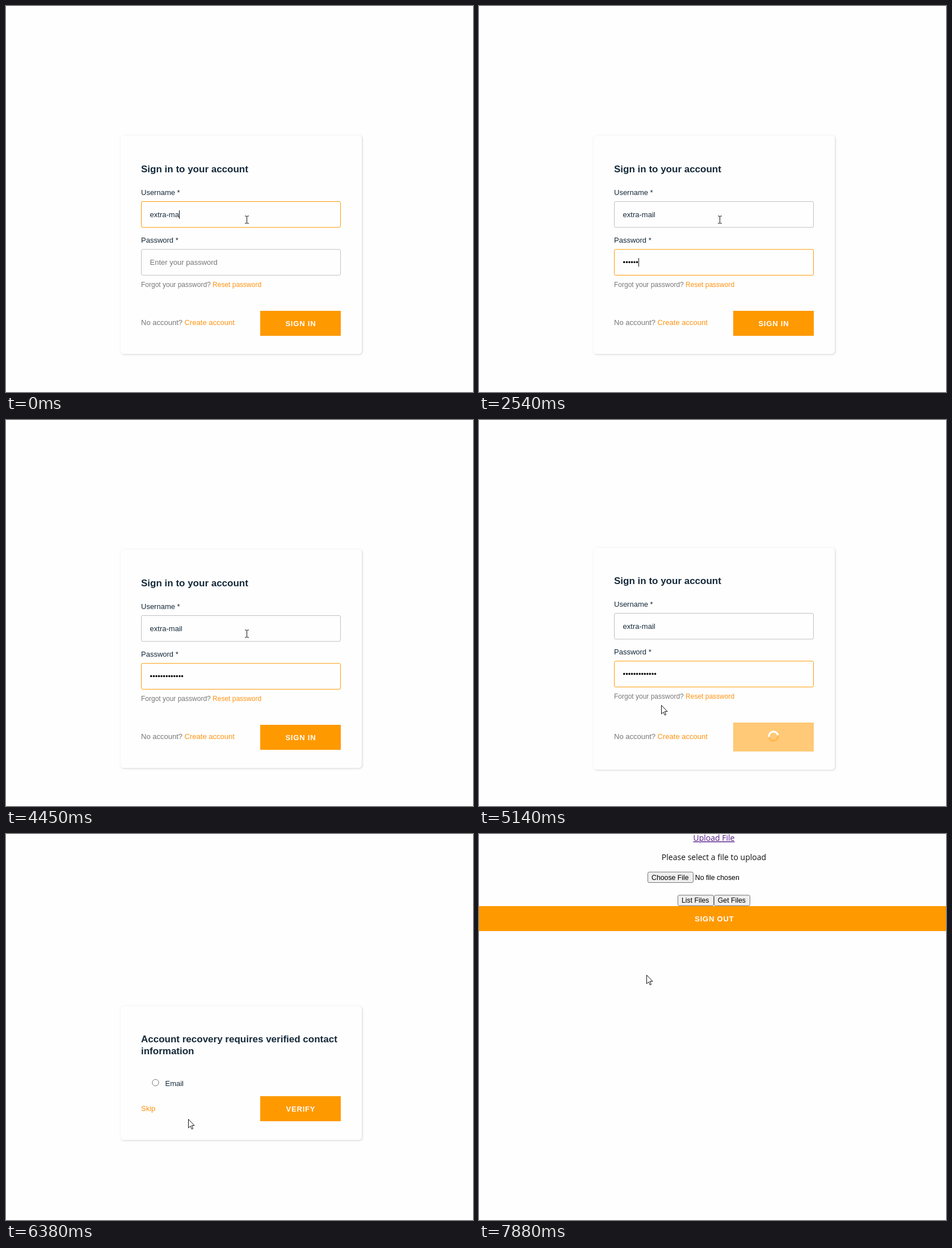
An HTML page for the animation above (8 s loop, 823 by 680 pixels).

```html
<!DOCTYPE html>
<html lang="en">
<head>
<meta charset="utf-8">
<title>Sign in</title>
<style>
html, body { margin: 0; width: 100%; height: 100%; overflow: hidden; background: #fefefe; }
#card {
  position: absolute; left: 202px; width: 425px; border-radius: 5.4px;
  background: #fefefe; box-shadow: 1px 1px 3.6px rgba(0, 0, 0, .17);
}
svg { position: absolute; left: 0; top: 0; }
text { font: 13px "Liberation Sans", Arial, sans-serif; fill: #152939; white-space: pre; }
text.title { font-size: 17px; font-weight: bold; }
text.hint { font-size: 12px; }
.grey { fill: #777; }
.link { fill: #ff9312; }
text.caps { font-weight: bold; letter-spacing: .8px; fill: #fff; text-anchor: middle; }
text.page { font: 14px "Open Sans", "Noto Sans", sans-serif; fill: #111; text-anchor: middle; }
text.page.visited { fill: #551a8b; text-decoration: underline; }
text.native { font-size: 12.3px; fill: #000; }
.field { fill: #fefefe; stroke: #c0c0c0; }
.field.focus { stroke: #f90; }
.orange { fill: #f90; }
.button rect { fill: #efefef; stroke: #767676; }
.cursor { fill: #fff; stroke: #111; stroke-linejoin: round; }
</style>
</head>
<body>
<div id="card"></div>
<svg width="823" height="680" viewBox="0 0 823 680">
  <g id="signIn">
    <g id="fields">
      <text class="title" x="238" y="293">Sign in to your account</text>
      <text x="238" y="333">Username *</text>
      <rect class="field" id="userField" x="238.5" y="344.5" width="351" height="45.5" rx="2.5"/>
      <text id="user" x="253.6" y="372"></text>
      <text x="238" y="417">Password *</text>
      <rect class="field" id="passField" x="238.5" y="428.8" width="351" height="45.5" rx="2.5"/>
      <text id="placeholder" class="grey" x="253.6" y="456">Enter your password</text>
      <text id="pass" x="253.6" y="456" style="fill:#000"></text>
      <rect id="caret" width="1" height="15" fill="#111"/>
      <text class="hint grey" x="238" y="495">Forgot your password? <tspan class="link">Reset password</tspan></text>
    </g>
    <text class="grey" x="238" y="562">No account? <tspan class="link">Create account</tspan></text>
    <g id="ready">
      <rect class="orange" x="448" y="537" width="142" height="44"/>
      <text class="caps" x="519.4" y="564">SIGN IN</text>
    </g>
    <g id="loading">
      <rect x="448" y="533" width="142" height="51" fill="#ffc977"/>
      <g id="spinner" fill="none" stroke-width="3.4">
        <circle r="8" stroke="#ffb952"/>
        <path d="M-8 0A8 8 0 0 1 8 0" stroke="#fff"/>
      </g>
    </g>
  </g>

  <g id="verify">
    <text class="title" x="238" y="367">Account recovery requires verified contact</text>
    <text class="title" x="238" y="387.5">information</text>
    <circle cx="263.5" cy="438" r="5.7" fill="#fff" stroke="#767676"/>
    <text x="280.5" y="444">Email</text>
    <text class="link" x="238" y="488">Skip</text>
    <rect id="ring" x="237.5" y="475" width="26" height="16.5" rx="2" fill="none" stroke="#101010" stroke-width="2"/>
    <rect class="orange" x="448" y="461.8" width="142" height="44.2"/>
    <text class="caps" x="519.4" y="489">VERIFY</text>
  </g>

  <g id="upload">
    <text class="page visited" x="414" y="12">Upload File</text>
    <text class="page" x="414" y="46">Please select a file to upload</text>
    <g class="button">
      <rect x="297.5" y="67" width="80" height="18.5" rx="2.5"/>
      <rect x="350.5" y="107.8" width="63" height="18.5" rx="2.5"/>
      <rect x="414.5" y="107.8" width="63" height="18.5" rx="2.5"/>
    </g>
    <text class="native" x="304" y="80.5">Choose File</text>
    <text class="native" x="380.8" y="80.5">No file chosen</text>
    <text class="native" x="357" y="121">List Files</text>
    <text class="native" x="420.8" y="121">Get Files</text>
    <rect class="orange" y="127" width="823" height="44"/>
    <text class="caps" x="414.8" y="154">SIGN OUT</text>
  </g>

  <path id="beam" class="cursor" style="fill:none" d="M-3 -6.5h2.5l1 1l1 -1h2.5M.5 -6V6M-3 6.5h2.5l1 -1l1 1h2.5"/>
  <path id="arrow" class="cursor" d="M.5 .5V15.8L4 12.5L6.4 18L8.6 17L6.2 11.6H11Z"/>
  <g id="hand" class="cursor">
    <path d="M-2 12V1.5a1.7 1.7 0 0 1 3.4 0V7.5c.3-1 2.6-1 3 .5c.5-.8 2.4-.6 2.7.7c.6-.6 2.2-.2 2.2 1.3V14c0 3-2 4-2 7.5H-.5c0-2-2-3.5-3.2-5.5L-6.4 11.8c-.8-1.4 1-2.6 2.2-1.4z"/>
    <path d="M1.4 7.5v3.5M4.4 8v3M7.1 8.7v2.8"/>
  </g>
</svg>
<script>
const LOOP = 8000, LOADING = 4600, VERIFY = 6380, RING = 7200, UPLOAD = 7320;
const FOCUS_PASS = 580;
const NAME = "extra-mail";
const nameKeys = [120, 270];
const passKeys = [1260, 1390, 1540, 1670, 2110, 2540, 2690, 2810, 2960, 3240, 3490, 3640, 3920];
const caretSteps = [[0, 1], [980, 0], [1260, 1], [4450, 0], [5260, 1], [5800, 0], [6230, 1]];
const cursorSteps = [
  [0, "beam", 424, 376.5],
  [4720, "arrow", 398, 404],
  [4870, "arrow", 345, 480],
  [4990, "arrow", 321, 502],
  [6780, "arrow", 303, 497],
  [6930, "arrow", 268, 495],
  [7050, "hand", 250, 478],
  [UPLOAD, "arrow", 249, 477],
  [7880, "arrow", 295, 248]
];

const $ = id => document.getElementById(id);
const show = (id, on) => { $(id).style.display = on ? "" : "none"; };
const move = (id, x, y, angle = 0) =>
  $(id).setAttribute("transform", `translate(${x} ${y}) rotate(${angle})`);
const current = (steps, t) => steps.filter(step => step[0] <= t).pop();
const pressed = (keys, t) => keys.filter(key => key <= t).length;

function setCard(top, bottom) {
  $("card").style.top = top + "px";
  $("card").style.height = bottom - top + "px";
}

function drawSignIn(t) {
  const loading = t >= LOADING, onPass = t >= FOCUS_PASS;
  const dots = pressed(passKeys, t);
  setCard(loading ? 224.5 : 227.5, loading ? 616 : 613);
  move("fields", 0, loading ? -4 : 0);
  $("user").textContent = NAME.slice(0, 8 + pressed(nameKeys, t));
  $("pass").textContent = "\u2022".repeat(dots);
  show("placeholder", !dots);
  $("userField").classList.toggle("focus", !onPass);
  $("passField").classList.toggle("focus", onPass);

  const typed = $(onPass ? "pass" : "user");
  const width = typed.textContent ? typed.getComputedTextLength() : 0;
  $("caret").setAttribute("x", Math.round(253.6 + width));
  $("caret").setAttribute("y", onPass ? 444 : 360);
  show("caret", current(caretSteps, t)[1]);

  show("ready", !loading);
  show("loading", loading);
  const turn = Math.floor((t - 4450) / 136) * 136;
  move("spinner", 519, 557, -12 + (turn - 680) * 90 / 1088);
}

function draw(t) {
  const page = t < VERIFY ? "signIn" : t < UPLOAD ? "verify" : "upload";
  for (const id of ["signIn", "verify", "upload"]) show(id, id === page);
  show("card", page !== "upload");
  if (page === "signIn") drawSignIn(t);
  if (page === "verify") setCard(303, 538.5);
  show("ring", t >= RING);

  const [, shape, x, y] = current(cursorSteps, t);
  for (const id of ["beam", "arrow", "hand"]) show(id, id === shape);
  move(shape, x, y);
}

const start = performance.now();
function tick() {
  draw((performance.now() - start) % LOOP);
  requestAnimationFrame(tick);
}
tick();
</script>
</body>
</html>
```
